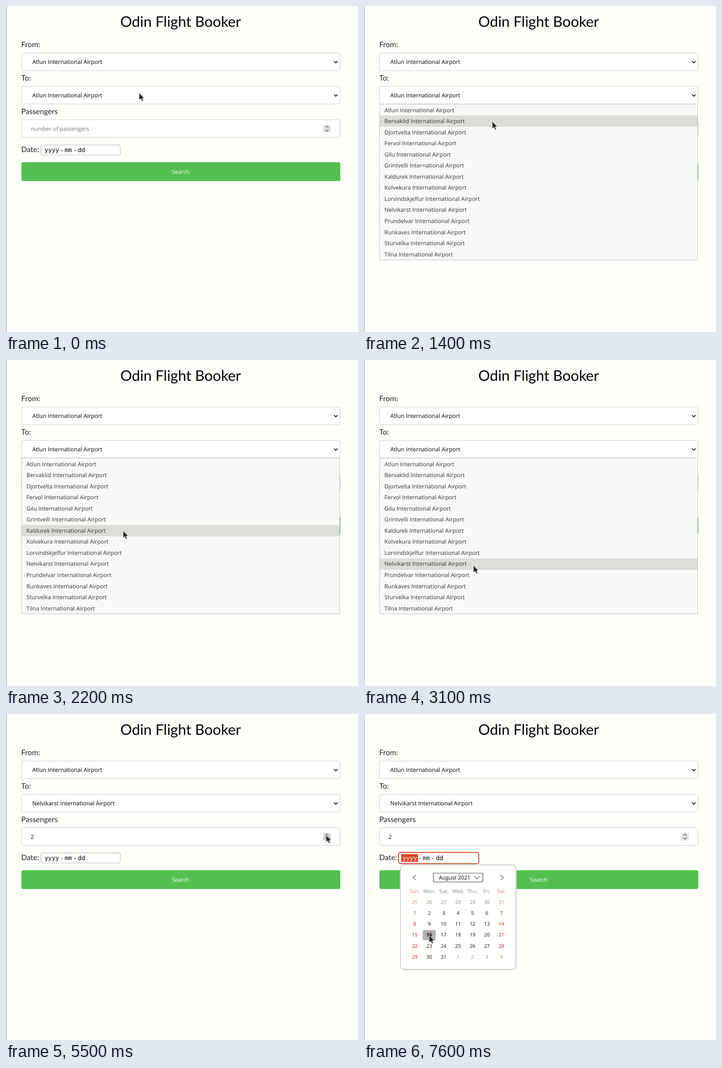
An HTML page for the animation above (8000 ms loop, 776 px wide and 721 px high).

```html
<!DOCTYPE html>
<html lang="en">
<head>
<meta charset="utf-8">
<title>Flight booker</title>
<style>
  html, body { margin: 0; width: 100%; height: 100%; overflow: hidden; background: #fffffc; }
  svg { display: block; font: 500 12.55px "Open Sans", "Noto Sans", sans-serif; text-rendering: geometricPrecision; }
  text { white-space: pre; }
  .label { font: 400 16.6px Lato, sans-serif; fill: #222; }
  .title { font: 400 32.2px Lato, sans-serif; }
  .mono { font: 13.33px "DejaVu Sans Mono", monospace; }
  .field { fill: #fffffe; stroke: #ccccc9; }
  .chev { fill: none; stroke: #555; stroke-width: 1.2; }
  .drop { fill: none; stroke: #111; stroke-width: 1.8; }
  .mid { text-anchor: middle; }
  #cal { font-size: 11px; }
</style>
</head>
<body>
<svg width="776" height="721" viewBox="0 0 776 721">
  <path d="M.5 0V721" stroke="#8e8e8c"/>
  <text class="title mid" x="385" y="46">Odin Flight Booker</text>
  <g id="form"></g>
  <text class="label" x="33.5" y="323">Date:</text>
  <text id="from" x="58" y="128"></text>
  <text id="to" x="58" y="202"></text>
  <text id="count" x="54.3" y="276" font-size="12.3"></text>
  <rect id="spinTop" x="699" y="263" width="17" height="8"/>
  <rect id="spinLow" x="699" y="271" width="17" height="8.5"/>
  <path class="chev" d="M704 269l3.6-3.7 3.6 3.7M704 273.5l3.6 3.7 3.6-3.7"/>
  <rect x="34" y="345.5" width="703" height="41.5" rx="4" fill="#53bf50"/>
  <text class="mid" x="385" y="370.5" font-size="12.3" fill="#fff">Search</text>

  <rect x="77" y="307" width="175" height="22.5" rx="4" fill="#fffffe" stroke="#bcbcb9" stroke-width="1.2"/>
  <path d="M79 329V309H250" fill="none" stroke="#e6e6e3"/>
  <g id="focus">
    <rect x="76" y="306" width="177" height="25" rx="5" fill="#fffffe" stroke="#d2482a" stroke-width="2"/>
    <rect x="82" y="310" width="37" height="17" fill="#d9451d"/>
  </g>
  <g class="mono">
    <text id="year" x="85" y="322.5">yyyy</text>
    <text x="119" y="322.5">-</text>
    <text x="129.3" y="322.5">mm</text>
    <text x="148" y="322.5">-</text>
    <text x="158.5" y="322.5">dd</text>
  </g>

  <g id="list">
    <rect x="34.5" y="217" width="701" height="344.5" fill="#f9faf7" stroke="#bfc1bd"/>
    <rect id="row" x="35" width="700" fill="#dcddd9"/>
  </g>

  <g id="cal">
    <rect x="80.5" y="334" width="254.5" height="231.5" rx="8" fill="none" stroke="#e3e5df" stroke-width="3"/>
    <rect x="80.5" y="334" width="254" height="230.5" rx="8" fill="#fffffe" stroke="#b9bcb5"/>
    <path class="chev" d="M114 356l-6 5.7 6 5.7M301 356l6 5.7-6 5.7"/>
    <rect x="153" y="352" width="109" height="19.5" rx="2.5" fill="#fffffe" stroke="#3c3c3c" stroke-width="1.2"/>
    <text x="165" y="366" font-size="12">August 2021</text>
    <path class="chev" d="M243.3 359l5.6 5.8 5.6-5.8"/>
    <rect id="day" width="28.5" height="22" rx="2.5" fill="#b0b0b0"/>
  </g>

  <g id="cursor">
    <path d="M1 2V17l3.7-3 2.6 5.7 2.8-1.2-2.5-5.6H12.5z" opacity=".14"/>
    <path d="M.3.5V16l3.6-3.2 2.5 5.7 2.7-1.2-2.5-5.5H11.3z" fill="#222" stroke="#fff" stroke-width=".7"/>
  </g>
</svg>
<script>
const $ = id => document.getElementById(id);
const LOOP = 8000, STEP = 100;
const COL_X = 112, COL_W = 31.8, DAY_Y = 416.3, DAY_H = 24.05;
const rowTop = i => Math.ceil(217.1 + 24.6 * i);

const airports = ['Atlun', 'Bervaklid', 'Djortvelta', 'Fervol', 'Gilu', 'Grintvelli', 'Kaldurek',
  'Kolvekura', 'Lorvindskjelfur', 'Nelvikarst', 'Prundelvar', 'Runkaves', 'Sturvelka', 'Tilna']
  .map(name => name + ' International Airport');

// Straight pointer moves; it rests between them
const home = { x: 293.3, y: 192 };
const moves = [
  { from: 1100, to: 1800, x: 268, y: 339.5 },
  { from: 1800, to: 2200, x: 258, y: 377.5 },
  { from: 2200, to: 2900, x: 241, y: 454 },
  { from: 3400, to: 3600, x: 166, y: 288.5 },
  { from: 3600, to: 3800, x: 181, y: 224 },
  { from: 3900, to: 4500, x: 719, y: 267 },
  { from: 4500, to: 4600, x: 705.5, y: 267.5 },
  { from: 5600, to: 6000, x: 193, y: 320 },
  { from: 6800, to: 7100, x: 299, y: 365 },
  { from: 7100, to: 7400, x: 115, y: 523 },
  { from: 7400, to: 7600, x: 143.5, y: 489.5 }
];

function pointer(t) {
  let { x, y } = home;
  for (const m of moves) {
    const k = Math.max(0, Math.min(1, (t - m.from) / (m.to - m.from)));
    x += (m.x - x) * k;
    y += (m.y - y) * k;
  }
  return [x, y];
}

function add(parent, tag, attrs, content = '') {
  const node = document.createElementNS('http://www.w3.org/2000/svg', tag);
  for (const [key, value] of Object.entries(attrs)) node.setAttribute(key, value);
  node.textContent = content;
  $(parent).append(node);
}

['From:', 'To:', 'Passengers'].forEach((name, i) => {
  const y = 104 + i * 73.75;
  add('form', 'text', { class: 'label', x: 33.5, y: y - 13 }, name);
  add('form', 'rect', { class: 'field', x: 34, y, width: 702.5, height: 39, rx: 4 });
  if (i < 2) add('form', 'path', { class: 'drop', d: `M723.3 ${y + 18}l3.8 3.8 3.8-3.8` });
});

airports.forEach((name, i) =>
  add('list', 'text', { x: 45, y: 234.5 + i * 24.55, fill: '#333' }, name));
$('from').textContent = airports[0];

['Sun.', 'Mon.', 'Tue.', 'Wed.', 'Thu.', 'Fri.', 'Sat.'].forEach((name, c) =>
  add('cal', 'text', { class: 'mid', x: COL_X + c * COL_W, y: 396, fill: c % 6 ? '#858585' : '#d9807d' }, name));

for (let i = 0; i < 42; i++) {
  const date = new Date(2021, 6, 25 + i), day = date.getDate();
  const col = i % 7, weekend = col % 6 === 0, inside = date.getMonth() === 7;
  add('cal', 'text', {
    class: 'mid', x: COL_X + col * COL_W, y: DAY_Y + Math.floor(i / 7) * DAY_H + 4,
    fill: inside ? (weekend ? '#b3241f' : '#111') : (weekend ? '#d98783' : '#858585'),
    'font-weight': inside && day === 16 ? 700 : 500
  }, day);
}

const set = (id, key, value) => $(id).setAttribute(key, value);
const show = (id, on) => { $(id).style.display = on ? '' : 'none'; };

function draw(t) {
  const [x, y] = pointer(t);
  set('cursor', 'transform', `translate(${x} ${y})`);

  show('list', t >= 900 && t < 3200);
  const row = Math.max(0, airports.findLastIndex((_, i) => y >= rowTop(i)));
  set('row', 'y', rowTop(row));
  set('row', 'height', rowTop(row + 1) - rowTop(row));
  $('to').textContent = airports[t < 3400 ? 0 : 9];

  const empty = t < 4600;
  $('count').textContent = empty ? 'number of passengers' : t < 5000 ? '1' : '2';
  set('count', 'fill', empty ? '#757575' : '#000');

  const over = t >= 4600 && t < 5700;
  set('spinTop', 'fill', !over ? '#e4e4e6' : t < 5500 ? '#cacacb' : '#dededf');
  set('spinLow', 'fill', over ? '#cacacb' : '#e4e4e6');

  const open = t >= 6600;
  show('focus', open);
  set('year', 'fill', open ? '#fff' : '#000');
  show('cal', open);
  set('cal', 'opacity', t < 6700 ? .5 : 1);
  const col = Math.round((x - COL_X) / COL_W), week = Math.round((y - DAY_Y) / DAY_H);
  show('day', col >= 0 && col < 7 && week >= 0 && week < 6);
  set('day', 'x', COL_X + col * COL_W - 14.2);
  set('day', 'y', DAY_Y + week * DAY_H - 10.5);
}

const start = performance.now();
function tick() {
  const t = (performance.now() - start) % LOOP;
  draw(Math.floor(t / STEP) * STEP);
  requestAnimationFrame(tick);
}
tick();
</script>
</body>
</html>
```
